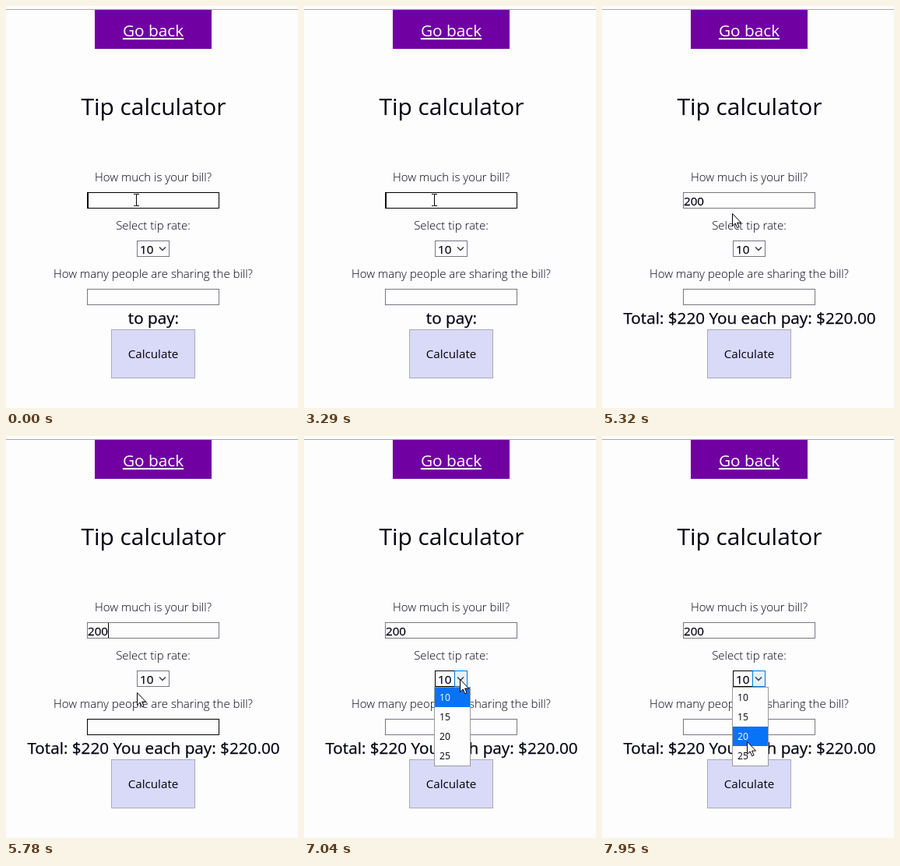
An HTML page for the animation above (8000 ms loop, 375 px wide and 516 px high).

```html
<!DOCTYPE html>
<html lang="en">
<head>
<meta charset="utf-8">
<title>Tip calculator</title>
<style>
  html, body { margin: 0; width: 100%; height: 100%; overflow: hidden; background: #fdfdfe; }
  svg { display: block; }
  text { font-family: "Open Sans", "Noto Sans", sans-serif; font-size: 15.2px; fill: #000010; white-space: pre; }
  .mid { text-anchor: middle; }
  .title { font-size: 29.9px; }
  .label { font-size: 15px; font-weight: 300; }
  .total { font-size: 20.7px; }
  .total, .value { stroke: #000010; stroke-width: .25px; }
  .link { font-size: 20.8px; fill: #fff; text-decoration: underline; text-decoration-thickness: 1px; }
  .option { font-size: 12.2px; }
  .field { fill: #fdfdfe; stroke: #777780; }
  .hover { stroke: #000; }
  .crisp { shape-rendering: crispEdges; }
</style>
</head>
<body>
<svg width="375" height="516" viewBox="0 0 375 516">
  <rect y="4" width="375" height="1" fill="#a8a8a8"/>
  <rect x="114" y="5" width="150" height="50" fill="#7000a2"/>
  <text class="mid link" x="189" y="39">Go back</text>
  <text class="mid title" x="189.5" y="140">Tip calculator</text>

  <text class="mid label" x="189" y="225">How much is your bill?</text>
  <rect id="bill" class="field" x="104.5" y="239.5" width="169" height="20"/>
  <text id="amount" class="value" x="105" y="255.5"></text>
  <rect id="caret" class="crisp" y="240" width="1" height="19"/>

  <text class="mid label" x="189" y="287">Select tip rate:</text>
  <rect id="rate" class="field" x="168.5" y="301.5" width="41" height="20"/>
  <rect id="arrowButton" x="193.5" y="301.5" width="16" height="20" fill="#e5f1fb" stroke="#0078d7"/>
  <text class="value" x="172" y="317.5">10</text>
  <path d="M197 309.5l4 4 4-4" fill="none" stroke="#333" stroke-width="1.3"/>

  <text class="mid label" x="189" y="349">How many people are sharing the bill?</text>
  <rect id="people" class="field" x="104.5" y="363.5" width="169" height="20"/>
  <text id="total" class="mid total" x="189.5" y="407.5"></text>
  <rect x="135.5" y="415.5" width="107" height="62" fill="#d9d9f8" stroke="#a9a9b8"/>
  <text class="mid" x="189" y="452">Calculate</text>

  <g id="list">
    <rect x="167.5" y="322.5" width="46" height="101" fill="#fdfdfe" stroke="#999"/>
    <rect id="highlight" x="168" width="45" height="25" fill="#0873f7"/>
  </g>

  <path id="arrow" d="M.5.5v16l3.7-3.5 2.5 5.7 2.4-1-2.5-5.6h5z" fill="#fff" stroke="#000"/>
  <path id="beam" d="M-3-7.5h2.5l.5.5.5-.5H4M.5-7.5v15M-3 7.5h2.5l.5-.5.5.5H4" fill="none" stroke="#000"/>
</svg>
<script>
const LOOP = 8000, OPEN = 7040;
const $ = id => document.getElementById(id);
const show = (el, on) => el.setAttribute("visibility", on ? "visible" : "hidden");

// pointer: time, x, y
const path = [
  [5200, 167, 249], [5780, 168, 329], [5920, 166, 344], [6020, 166, 344],
  [6040, 162, 346], [6210, 162, 346], [6640, 178, 330], [7010, 200, 312],
  [7250, 200, 312], [7510, 184, 353], [7810, 186, 386], [7900, 186, 386], [7950, 186, 392]
];
// typing: time, bill, caret x
const typed = [[0, "", 105], [3800, "2", 114], [4200, "20", 122], [4440, "200", 131]];
// moments when the caret flips, starting visible
const blinks = [190, 810, 1440, 2060, 2680, 3290, 4480, 4630, 5240, 5760, 6400, 7010, OPEN];

const options = [10, 15, 20, 25].map((rate, i) => {
  const text = document.createElementNS("http://www.w3.org/2000/svg", "text");
  text.setAttribute("class", "option");
  text.setAttribute("x", 174);
  text.setAttribute("y", 340 + 25 * i);
  text.textContent = rate;
  return $("list").appendChild(text);
});

function pointer(t) {
  const i = path.findIndex(p => p[0] > t);
  if (i === 0) return path[0].slice(1);
  if (i < 0) return path[path.length - 1].slice(1);
  const [t0, x0, y0] = path[i - 1], [t1, x1, y1] = path[i];
  const k = (t - t0) / (t1 - t0);
  return [x0 + (x1 - x0) * k, y0 + (y1 - y0) * k];
}

function totalText(bill) {
  if (!bill) return "to pay:";
  const sum = bill * 11 / 10;
  return `Total: $${sum} You each pay: $${sum.toFixed(2)}`;
}

function draw(t) {
  const [x, y] = pointer(t).map(Math.round);
  const open = t >= OPEN;
  const [, bill, caretX] = typed.filter(s => s[0] <= t).pop();

  $("amount").textContent = bill;
  $("total").textContent = totalText(bill);
  $("caret").setAttribute("x", caretX);
  show($("caret"), !open && blinks.filter(b => b <= t).length % 2 === 0);

  // hovering a label also lights up its field
  const inBill = y < 260;
  $("bill").classList.toggle("hover", inBill);
  $("rate").classList.toggle("hover", open || (y > 300 && y < 322));
  $("people").classList.toggle("hover", !open && y >= 329);

  show($("arrowButton"), open);
  show($("list"), open);
  const lagged = pointer(t - 40)[1];
  const active = Math.max(0, Math.floor((lagged - 323) / 25));
  $("highlight").setAttribute("y", 323 + 25 * active);
  options.forEach((o, i) => o.style.fill = i === active ? "#fff" : "#000010");

  for (const id of ["arrow", "beam"]) $(id).setAttribute("transform", `translate(${x} ${y})`);
  show($("beam"), inBill);
  show($("arrow"), !inBill);
}

function frame() {
  draw(performance.now() % LOOP);
  requestAnimationFrame(frame);
}
frame();
</script>
</body>
</html>
```
